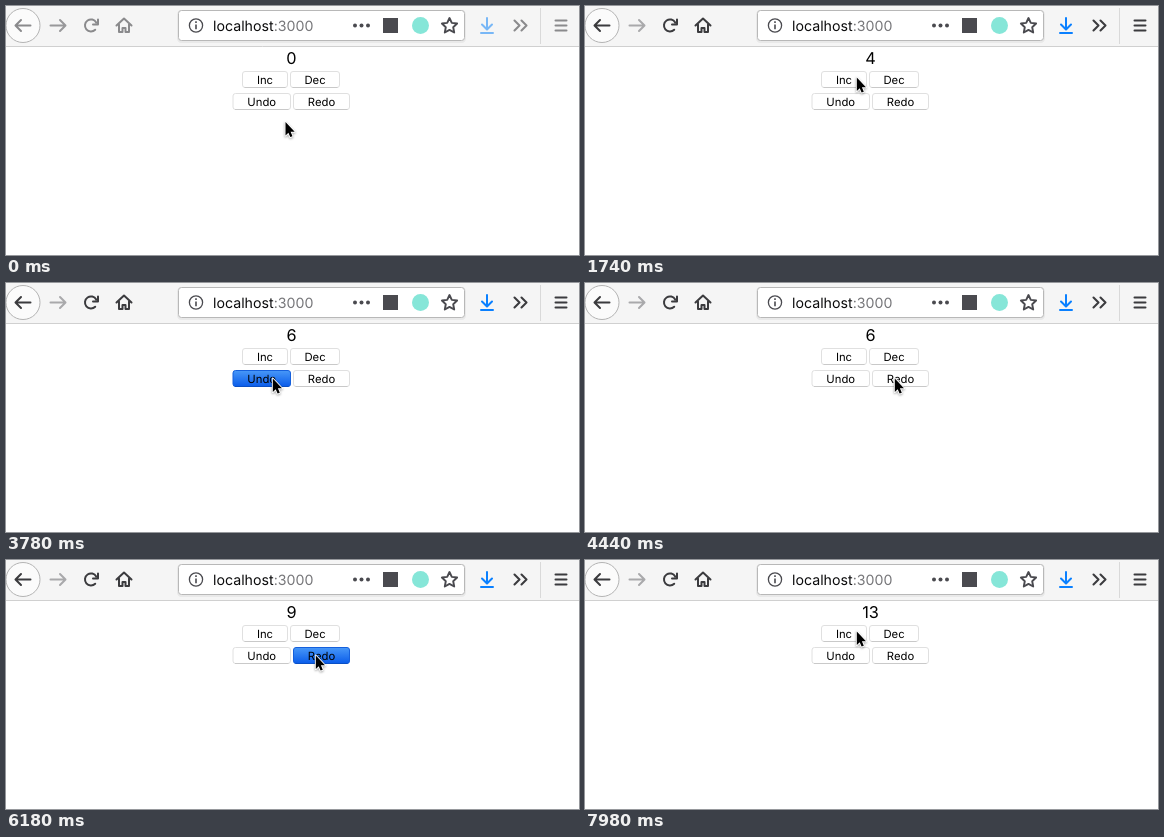
Recreate the animation shown at these times as an HTML page. Size 573 px wide and 249 px high, loop 8 s.

```html
<!DOCTYPE html>
<html lang="en">
<head>
<meta charset="utf-8">
<title>Counter with undo and redo</title>
<style>
  html, body { margin: 0; width: 100%; height: 100%; overflow: hidden; background: #fff; }
  svg { display: block; width: 573px; height: 249px; font-family: Inter, "Liberation Sans", sans-serif; }
  text { white-space: pre; text-rendering: geometricPrecision; }
  .chrome { --ink: #3b3b3e; --dim: #a9a9ab; --blue: #0a80ff; }
  .chrome.idle { --ink: #8a8a8c; --dim: #98989a; --blue: #78b7f6; }
  .icon { fill: none; stroke: var(--ink); stroke-width: 2; stroke-linecap: round; stroke-linejoin: round; }
  .field { fill: none; stroke: #4a4a4f; }
  .button rect { fill: #fff; stroke: #e0e0e0; }
  .button path { stroke: #c9c9c9; }
  .button text { font-size: 11.3px; text-anchor: middle; }
  .button.down rect { fill: url(#press); stroke: #1560dc; }
  .button.down path { stroke: #0a4fc4; }
</style>
</head>
<body>
<svg viewBox="0 0 573 249">
  <defs>
    <linearGradient id="press" x2="0" y2="1">
      <stop offset="0" stop-color="#4898f8"/>
      <stop offset="1" stop-color="#0a5cea"/>
    </linearGradient>
  </defs>
  <rect width="573" height="249" fill="#fff"/>

  <g id="chrome" class="chrome">
    <rect width="573" height="41" fill="#f5f5f5"/>
    <path d="M0 40.5H573" stroke="#d0d0d0"/>
    <circle cx="17" cy="19.5" r="17" fill="#fbfbfb" stroke="#b4b4b4"/>
    <path class="icon" d="M24.5 19.5H10M15 14L9.5 19.5L15 25"/>
    <path class="icon" style="stroke:var(--dim)" d="M44.5 19.5H59M54 14L59.5 19.5L54 25"/>
    <path class="icon" d="M89.2 23.7A6 6 0 1 1 90.2 16.500M92 13.500V18.500H87"/>
    <path class="icon" d="M110.500 19.500L118 12.500L125.500 19.500M113 18.500V26H116.500V22H119.500V26H123V18.500"/>

    <rect x="172.500" y="5.500" width="286" height="30" rx="3" fill="none" stroke="#000" stroke-opacity=".05" stroke-width="3"/>
    <rect x="172.500" y="4.500" width="286" height="30" rx="3" fill="#fff" stroke="#b8b8b8"/>
    <circle class="field" cx="190" cy="19.500" r="6.600" stroke-width="1.300"/>
    <path class="field" d="M190 18.500V23.200M190 15.300V17" stroke-width="1.600"/>
    <text x="207" y="25" font-size="14.200" fill="#0c0c0d">localhost<tspan fill="#77777a">:3000</tspan></text>
    <g fill="#4a4a4f">
      <circle cx="349" cy="19.500" r="2"/>
      <circle cx="355.500" cy="19.500" r="2"/>
      <circle cx="362" cy="19.500" r="2"/>
      <rect x="377" y="12" width="15" height="15"/>
    </g>
    <circle cx="414.500" cy="19.500" r="8.500" fill="#86e6d8"/>
    <path id="star" class="field" stroke-width="1.900" stroke-linejoin="round"/>

    <path class="icon" style="stroke:var(--blue)" d="M481 12V23M476 18.500L481 23.500L486 18.500M475 27H487"/>
    <path class="icon" d="M508.500 14.500L513.500 19.500L508.500 24.500M515.500 14.500L520.500 19.500L515.500 24.500"/>
    <path d="M534.500 2V38" stroke="#d9d9d9"/>
    <path class="icon" d="M549.500 14.500H560.500M549.500 19.500H560.500M549.500 24.500H560.500"/>
  </g>

  <text id="count" x="285.500" y="57.500" font-size="16.300" text-anchor="middle">0</text>
  <g id="buttons"></g>

  <g id="cursor" style="filter:drop-shadow(0 1px 1px rgba(0,0,0,.35))">
    <path d="M.5 .5V14L3.400 11.200L5.300 15.600L7.500 14.700L5.600 10.300H9.700Z" stroke="#fff" stroke-width="1.800" paint-order="stroke" stroke-linejoin="round"/>
  </g>
</svg>

<script>
const LOOP = 8000, STEP = 60;
const $ = id => document.getElementById(id);

// name: label, x, y, width
const layout = {
  inc: ["Inc", 236.5, 65.5, 45],
  dec: ["Dec", 284.5, 65.5, 49],
  undo: ["Undo", 227, 87.5, 57.5],
  redo: ["Redo", 287.5, 87.5, 56]
};

// button, press times, hold time
const clicks = [
  ["inc", [1020, 1200, 1380, 1620, 1800, 1980, 2160, 2460, 2580], 60],
  ["undo", [3000, 3240, 3480, 3780], 60],
  ["redo", [4320, 4560, 4860, 5100, 5280], 60],
  ["redo", [5700, 6120], 120],
  ["inc", [7320, 7500, 7740, 7920], 60]
].flatMap(([name, times, hold]) => times.map(down => ({ name, down, up: down + hold })));

// time, x, y of the pointer tip
const path = [
  [0, 279, 115.5], [60, 271, 227], [120, 270, 260],
  [600, 270, 260], [660, 275, 152], [900, 271.3, 71],
  [2640, 271.3, 71], [2880, 266.3, 95],
  [3840, 266.3, 95], [4140, 309.3, 95],
  [6540, 309.3, 95], [6900, 304, 72], [7140, 271.3, 71]
];

const ACTIVATE = 900;

const buttons = {};
for (const [name, [label, x, y, w]] of Object.entries(layout)) {
  $("buttons").insertAdjacentHTML("beforeend",
    `<g class="button"><rect x="${x}" y="${y}" width="${w}" height="16" rx="2.5"/>
     <path d="M${x + 2} ${y + 16}h${w - 4}"/>
     <text x="${x + w / 2}" y="${y + 12}">${label}</text></g>`);
  buttons[name] = $("buttons").lastElementChild;
}

const starPoints = Array.from({ length: 10 }, (_, i) => {
  const r = i % 2 ? 3.9 : 8, a = Math.PI * (i / 5 - .5);
  return [443.5 + r * Math.cos(a), 20 + r * Math.sin(a)].map(v => v.toFixed(2));
});
$("star").setAttribute("d", "M" + starPoints.join("L") + "Z");

function countAt(t) {
  let n = 0, top = 0;
  for (const { name, up } of clicks) {
    if (up > t) break;
    if (name === "inc") top = ++n;
    else if (name === "undo") n--;
    else n = Math.min(n + 1, top);
  }
  return n;
}

function pointerAt(t) {
  const i = path.findIndex(p => p[0] > t);
  if (i < 0) return path[path.length - 1].slice(1);
  const [t0, x0, y0] = path[i - 1], [t1, x1, y1] = path[i];
  const u = (t - t0) / (t1 - t0), s = u * u * (3 - 2 * u);
  return [x0 + (x1 - x0) * s, y0 + (y1 - y0) * s];
}

function draw(time) {
  const t = Math.floor(time / STEP) * STEP;
  const pressed = clicks.find(c => c.down <= t && t < c.up);
  for (const name in buttons)
    buttons[name].classList.toggle("down", pressed?.name === name);
  $("chrome").classList.toggle("idle", t < ACTIVATE);
  $("count").textContent = countAt(t);
  $("cursor").setAttribute("transform", `translate(${pointerAt(t)})`);
}

const start = performance.now();
function tick() {
  draw((performance.now() - start) % LOOP);
  requestAnimationFrame(tick);
}
tick();
</script>
</body>
</html>
```
